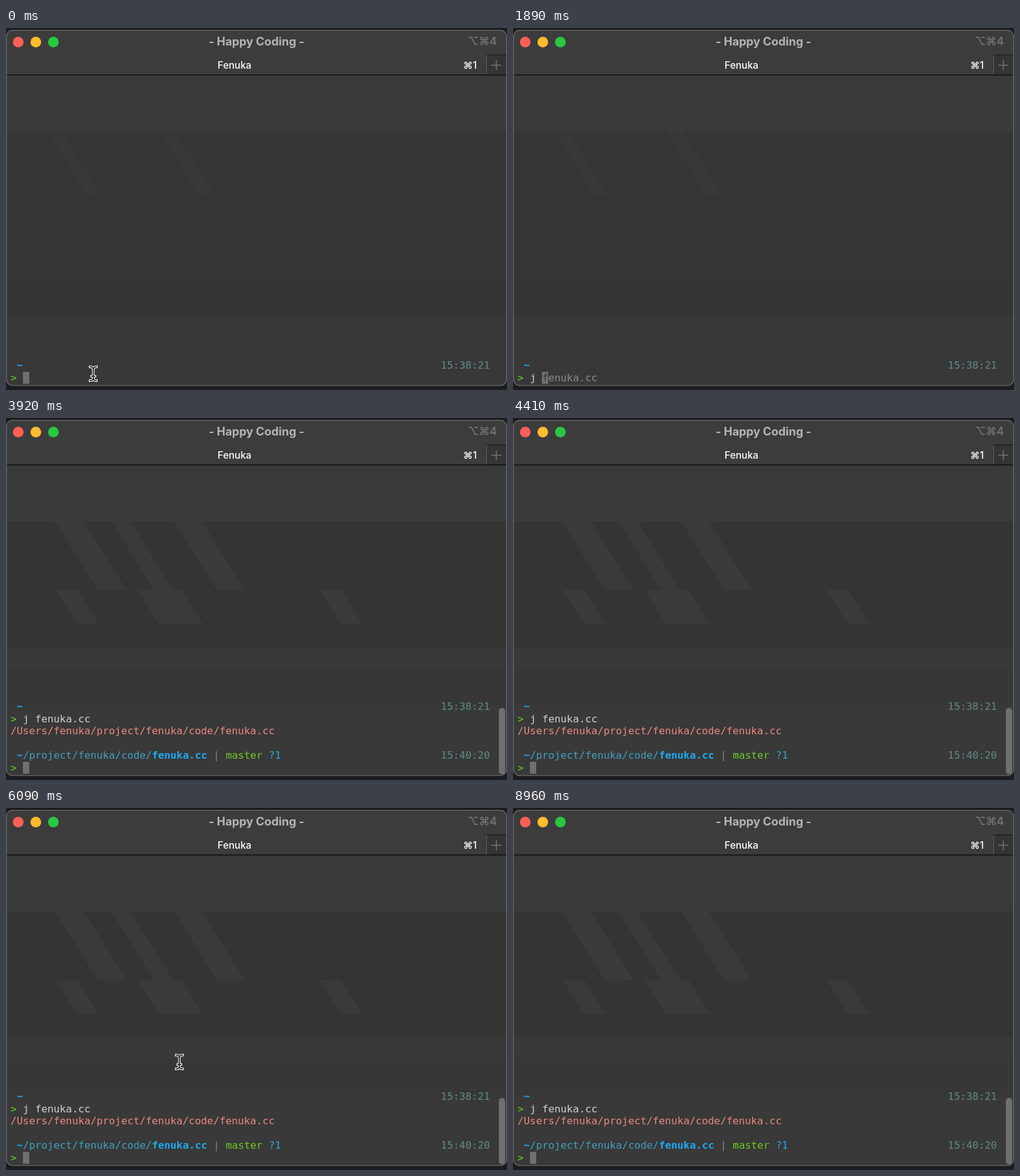
An HTML page with a canvas that plays this animation: 798x578 px, repeating every 9030 ms.

```html
<!DOCTYPE html>
<html lang="en">
<head>
<meta charset="utf-8">
<title>Terminal</title>
<style>
  html, body { margin: 0; width: 798px; height: 578px; overflow: hidden; background: #1b1b20; }
  canvas { display: block; }
</style>
</head>
<body>
<canvas id="stage" width="798" height="578"></canvas>
<script>
const ctx = document.getElementById('stage').getContext('2d');
const LOOP = 9030;
const CELL = 9.79, LEFT = 7.3, ROW = 19.6, LAST_BASE = 564;
const MONO = '16.26px "DejaVu Sans Mono", monospace';
const UI = 'Inter, "DejaVu Sans", sans-serif';
const SITE = 'fenuka.cc';
const TIMES = { command: 560, space: 910, accept: 2450, enter: 3640 };
const C = { text: '#d2d2d2', hint: '#8b8b8b', clock: '#63898a', green: '#6fcb25',
            blue: '#1caaf4', path: '#419fc0', pink: '#ee8783', block: '#707070' };

// Pointer path after the command ran: [time, x, y]
const POINTER = [[4690, 345, 255], [5040, 160, 555], [5320, 193, 551],
                 [5880, 193, 551], [6300, 358, 262], [6580, 364, 90]];

function rect(x, y, w, h, color) {
  ctx.fillStyle = color;
  ctx.fillRect(x, y, w, h);
}

function disc(x, y, r, color) {
  ctx.fillStyle = color;
  ctx.beginPath();
  ctx.arc(x, y, r, 0, 7);
  ctx.fill();
}

function label(text, x, y, font, color, align) {
  ctx.font = font + ' ' + UI;
  ctx.fillStyle = color;
  ctx.textAlign = align;
  ctx.fillText(text, x, y);
}

// Rows count upwards from the bottom prompt line.
function put(text, col, row, color, bold) {
  ctx.font = (bold ? 'bold ' : '') + MONO;
  ctx.fillStyle = color;
  ctx.textAlign = 'left';
  ctx.fillText(text, LEFT + col * CELL, LAST_BASE - row * ROW);
}

function cursor(col) {
  rect(Math.round(LEFT + col * CELL), 549, 10, 19, C.block);
}

function band(x, y, w, h, color) {
  const lean = h * 0.62;
  ctx.fillStyle = color;
  ctx.beginPath();
  ctx.moveTo(x, y);
  ctx.lineTo(x + w, y);
  ctx.lineTo(x + w + lean, y + h);
  ctx.lineTo(x + lean, y + h);
  ctx.fill();
}

function backdrop(ran) {
  const light = ran ? '#393b3a' : '#3a3a3a';
  const dark = ran ? '#343432' : '#353535';
  rect(0, 0, 798, 578, light);
  rect(0, 165, 798, 235, dark);
  rect(0, 400, 798, 58, ran ? '#363736' : '#343434');
  rect(0, 458, 798, 120, ran ? '#383938' : '#383838');
  if (ran) {
    band(78, 165, 46, 110, light);
    band(168, 165, 30, 110, light);
    band(268, 165, 44, 110, light);
    band(80, 275, 34, 54, light);
    band(210, 275, 70, 54, light);
    band(500, 275, 34, 54, light);
    rect(0, 366, 798, 34, '#383938');
  } else {
    band(66, 165, 22, 100, '#383838');
    band(244, 165, 26, 100, '#383838');
  }
}

function line(x1, y1, x2, y2, color, width = 1) {
  ctx.strokeStyle = color;
  ctx.lineWidth = width;
  ctx.beginPath();
  ctx.moveTo(x1, y1);
  ctx.lineTo(x2, y2);
  ctx.stroke();
}

function titleBar() {
  rect(0, 0, 798, 75, '#3c3c3c');
  ['#ff5f57', '#febc2e', '#28c840'].forEach((c, i) => disc(19.5 + 28 * i, 22.5, 8.5, c));
  label('- Happy Coding -', 399, 28, 'bold 18.3px', '#b5b5b5', 'center');
  label('⌥⌘4', 782, 26.5, '600 17.5px', '#737373', 'right');
  label('Fenuka', 364, 64.5, '500 15.5px', '#ffffff', 'center');
  label('⌘1', 750, 64.5, '500 15.5px', '#ffffff', 'right');
  rect(765, 43, 33, 32, '#343434');
  line(764, 43, 798, 43, '#202020', 1.5);
  line(765.5, 43, 765.5, 75, '#5e5e5e');
  line(773, 59.5, 789, 59.5, '#747474', 1.5);
  line(781, 51.5, 781, 67.5, '#747474', 1.5);
  line(0, 75, 798, 75, '#191919', 1.8);
}

function promptLine(row, clock) {
  put('~', 1, row, C.blue, true);
  put(clock, 70, row, C.clock);
}

function terminal(t) {
  const ran = t >= TIMES.enter;
  const oldRow = ran ? 4 : 0;
  promptLine(oldRow + 1, '15:38:21');
  put('>', 0, oldRow, C.green);
  if (ran) {
    put('j ' + SITE, 2, 4, C.text);
    put('/Users/fenuka/project/fenuka/code/' + SITE, 0, 3, C.pink);
    promptLine(1, '15:40:20');
    put('/project/fenuka/code/', 2, 1, C.path);
    put(SITE, 23, 1, C.blue, true);
    put('|', 33, 1, '#858585');
    put('master', 35, 1, C.green);
    put('?1', 42, 1, '#2ba9df');
    put('>', 0, 0, C.green);
    cursor(2);
    ctx.fillStyle = '#6e6f6e';
    ctx.beginPath();
    ctx.roundRect(785, 463, 10, 106, 5);
    ctx.fill();
  } else if (t < TIMES.command) {
    cursor(2);
  } else {
    const accepted = t >= TIMES.accept;
    const spaced = t >= TIMES.space;
    cursor(accepted ? 13 : spaced ? 4 : 3);
    put('j', 2, 0, C.text);
    put(SITE, 4, 0, accepted ? C.text : C.hint);
    if (spaced && !accepted) put(SITE[0], 4, 0, '#303030');
  }
}

function pointerAt(t) {
  if (t < TIMES.command) return [139, 552];
  const i = POINTER.findIndex(p => p[0] > t);
  if (i < 1) return null;
  const [t0, x0, y0] = POINTER[i - 1], [t1, x1, y1] = POINTER[i];
  let k = (t - t0) / (t1 - t0);
  k = k * k * (3 - 2 * k);
  return [x0 + (x1 - x0) * k, y0 + (y1 - y0) * k];
}

function iBeam([x, y]) {
  const beam = new Path2D('M-5-11Q0-11 0-7Q0-11 5-11M0-7V7M-5 11Q0 11 0 7Q0 11 5 11M-2.5 4H2.5');
  ctx.save();
  ctx.translate(x, y);
  ctx.lineCap = 'square';
  for (const [color, width] of [['#f4f4f4', 4], ['#111111', 1.6]]) {
    ctx.strokeStyle = color;
    ctx.lineWidth = width;
    ctx.stroke(beam);
  }
  ctx.restore();
}

function draw(now) {
  const t = now % LOOP;
  rect(0, 0, 798, 578, '#1b1b20');
  ctx.save();
  ctx.beginPath();
  ctx.roundRect(0.5, 3.5, 797, 567.5, 10);
  ctx.clip();
  backdrop(t >= TIMES.enter);
  titleBar();
  terminal(t);
  ctx.restore();
  ctx.strokeStyle = '#6a6a6a';
  ctx.lineWidth = 1.3;
  ctx.beginPath();
  ctx.roundRect(0.7, 3.7, 796.6, 567.2, 10);
  ctx.stroke();
  const pointer = pointerAt(t);
  if (pointer) iBeam(pointer);
}

const start = performance.now();
function tick() {
  draw(performance.now() - start);
  requestAnimationFrame(tick);
}
tick();
</script>
</body>
</html>
```
